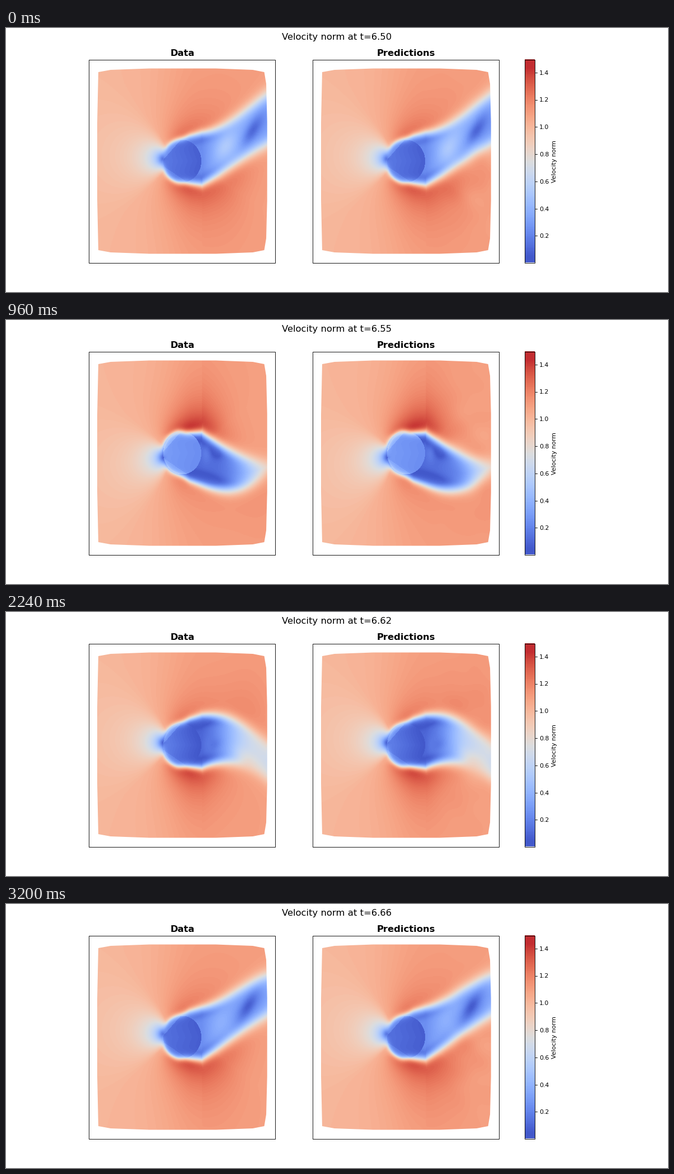
These frames come from a looping animation (1183 px wide and 473 px high, 3360 ms). A matplotlib script:

```python
import numpy as np
import matplotlib
import matplotlib.pyplot as plt
from matplotlib.animation import FuncAnimation
from matplotlib.colors import ListedColormap
from matplotlib.patches import Polygon, Rectangle

W, H, DPI = 1183, 473, 64
FRAMES, STEP = 21, 160
HALF = 10.4              # frames per half shedding cycle
PERIOD = 2 * HALF
CX, CY, RX, RY = 315, 238.5, 34, 38
VMAX = 1.494
SHIFT = 400              # distance between the two panels
TOP, BOTTOM = 56.5, 420.5
PX = 72 / DPI            # points per pixel

xs = np.arange(162, 468) + 0.5
ys = np.arange(71, 407) + 0.5
X, Y = np.meshgrid(xs, ys)
DX, DY = X - CX, Y - CY
RHO = np.hypot(DX / RX, DY / RY)
NEAR = np.clip((xs - 300) / 50, 0, 1)    # along the rear of the cylinder
FAR = np.clip((xs - 350) / 116, 0, 1)    # along the open wake


def smoothstep(a, b, v):
    t = np.clip((v - a) / (b - a), 0, 1)
    return t * t * (3 - 2 * t)


def bell(v, centre, width):
    return np.exp(-((v - centre) / width) ** 2)


def wave(k, peak, period=PERIOD):
    return np.cos(2 * np.pi * (k - peak) / period)


def blob(x, y, along, across, tilt):
    c, s = np.cos(tilt), np.sin(tilt)
    u, v = X - x, Y - y
    return bell(u * c + v * s, 0, along) * bell(v * c - u * s, 0, across)


def edge_depth(p, side):
    """Distance inside the wake edge; side is +1 for the top, -1 for the bottom."""
    height = 38 + 10 * NEAR - 18 * FAR
    height = height + (2 + 8 * NEAR + 65 * FAR) * wave(p, 17 + 3.4 * FAR)
    height = height + 20 * FAR ** 2 * wave(p, 1.3, HALF)
    slope = np.gradient(height)
    return (height + side * DY) / np.sqrt(1 + slope ** 2)


def lobes(p, depth):
    """Fast flow hugging the outside of one wake edge."""
    p %= PERIOD
    fade = np.exp(-np.where(depth < 0, -depth / 44, depth / 12))
    shoulder = (.14 + .13 * wave(p, 6.5)) * bell(X, 335, np.where(X < 335, 36, 62))
    crest = .17 * max(0, np.sin(np.pi * (p - 2) / 16)) * bell(X, 350 + 9 * (p - 4), 48)
    return (shoulder + crest) * fade


def outer_flow(k):
    """Potential flow past the cylinder with a swaying stagnation point."""
    turn = np.exp(-1j * 8 * wave(k, 17.3) / RY)
    stretch = np.where(DX > 0, 2.2, 1)
    z = (DX / RX / stretch + 1j * DY / RY) * turn
    z = z / np.abs(z) * np.maximum(np.abs(z), 1)
    v = np.abs(1 - 1 / z ** 2)
    v = np.where(DX > 0, np.maximum(v, 1), v)
    base = 1 + .045 * (1 + np.tanh((X - 290) / 50))
    return base * np.minimum(v, 1) + .25 * np.maximum(v - 1, 0)


def body_speed(k, q):
    slant = .03 + .08 * bell(q, 2.3, 1.8)
    v = .17 + .1 * wave(k, 7) - slant * (DX + .4 * np.abs(DY)) / RX
    v = v + .09 * (Y < 235 - 1.14 * (X - 282))
    return v + .05 * (Y > 248 + .675 * (X - 282))


def wake_speed(k, q, side, depth):
    v = .16 + .37 * FAR + (.08 + .17 * FAR) * wave(k, 6 * FAR - .7, HALF)
    v = v - .1 * bell(depth, 13, 8) * bell(X, 350, 45)
    # pale vortex core and the dark band ahead of it, both drifting downstream
    v = v + .32 * bell(q, 1.7, 1.9) * blob(392 + 10 * q, CY - 26 * side, 26, 15, -.9 * side)
    v = v - .2 * bell(q, -.3, 2) * blob(440 + 10.5 * q, CY - 54 * side, 30, 11, -1.05 * side)
    # small eddy and dark strip while a new vortex rolls up
    young = bell(abs(q), 4.8, 1.3)
    roll = side if q < 0 else -side
    v = v - .1 * young * blob(375, CY - roll * 2, 12, 9, -roll * .7)
    v = v + .07 * young * blob(358, CY, 9, 18, 0)
    return v - .08 * young * blob(365, CY - roll * 42, 40, 9, -roll * .3)


def speed(k):
    n = round(k / HALF)
    q = k - HALF * n
    side = 1 if n % 2 == 0 else -1
    top, bottom = edge_depth(k, 1), edge_depth(k + HALF, -1)
    mix = smoothstep(300, 330, X)
    depth = (1 - mix) * (1.04 - RHO) * 36 + mix * np.minimum(top, bottom)
    outer = outer_flow(k) + lobes(k, top) + lobes(k + HALF, bottom)
    inner = np.where(RHO < 1, body_speed(k, q), wake_speed(k, q, side, depth))
    inner = np.maximum(inner, .03)
    width = np.interp(X, [290, 330, 400, 466], [2.4, 3.4, 6, 7])
    share = 1 / (1 + np.exp(np.clip(depth / width, -40, 40)))
    return inner + (outer - inner) * share


def ripple(k):
    """Small downstream errors of the predicted field."""
    u = X - 9 * k
    wobble = np.sin(u / 15 + Y / 31) * np.sin(Y / 14 - u / 40)
    wobble = wobble + .5 * np.sin(u / 9 - Y / 17) * np.sin(Y / 21)
    return .025 * wobble * smoothstep(340, 420, X) * bell(DY, 0, 95)


fig = plt.figure(figsize=(W / DPI, H / DPI), dpi=DPI, facecolor="white")
ax = fig.add_axes([0, 0, 1, 1])
ax.axis("off")
shades = np.clip(np.linspace(0, 1, 128), .03, .96)
look = dict(cmap=ListedColormap(matplotlib.colormaps["coolwarm"](shades)),
            vmin=0, vmax=VMAX, aspect="auto", interpolation="nearest")
line = dict(fill=False, edgecolor="black", linewidth=.9 * PX)

upper = [(163, 170), (165, 79), (187, 75), (256, 72.5), (375, 72.5),
         (441, 75), (461.5, 79), (465, 100), (466.7, 168)]
outline = upper + [(x, 2 * CY - y) for x, y in reversed(upper)]


def add_panel(dx, title):
    img = ax.imshow(np.zeros_like(X), extent=(162 + dx, 468 + dx, 407, 71), **look)
    img.set_clip_path(Polygon([(x + dx, y) for x, y in outline], transform=ax.transData))
    ax.add_patch(Rectangle((148.5 + dx, TOP), 333, BOTTOM - TOP, **line))
    ax.text(315 + dx, 50.2, title, fontsize=16.43 * PX, weight="bold", ha="center")
    return img


data = add_panel(0, "Data")
pred = add_panel(SHIFT, "Predictions")

ax.imshow(np.linspace(VMAX, 0, 128)[:, None],
          extent=(927.5, 945.5, BOTTOM, TOP), **look)
ax.add_patch(Rectangle((927.5, TOP), 18, BOTTOM - TOP, **line))
for i in range(1, 8):
    y = 421 - 243.75 * .2 * i
    ax.plot([946, 949.5], [y, y], color="black", lw=.9 * PX)
    ax.text(953.2, y, f"{.2 * i:.1f}", fontsize=10.95 * PX, va="center_baseline")
ax.text(979.7, 239, "Velocity norm", fontsize=10.95 * PX, rotation=90,
        ha="center", va="center")
heading = ax.text(591.5, 9.46, "", fontsize=16.43 * PX, ha="center", va="top")
ax.set_xlim(0, W)
ax.set_ylim(H, 0)


def draw(k):
    v = speed(k)
    data.set_data(v)
    pred.set_data(v + ripple(k))
    heading.set_text(f"Velocity norm at t={6.504 + .008 * k:.2f}")
    return data, pred, heading


anim = FuncAnimation(fig, draw, frames=FRAMES, interval=STEP, repeat=True, repeat_delay=0)
plt.show()
```
